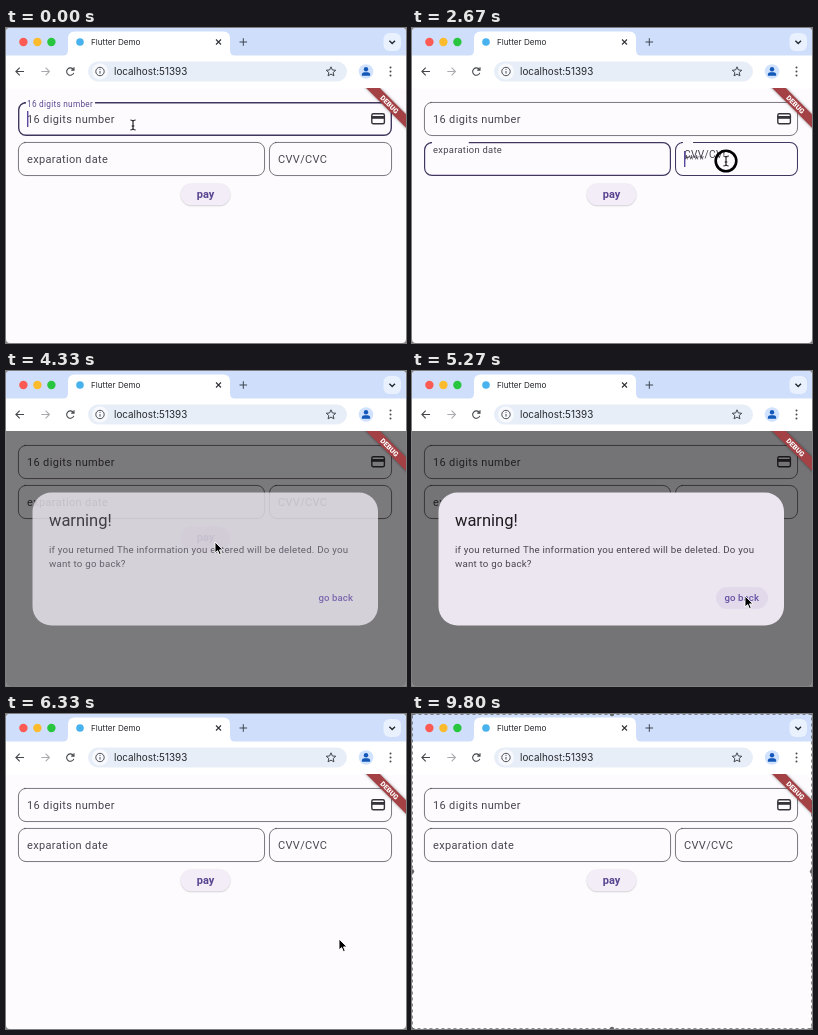
Write an HTML page with a canvas that moves like this. It is 400 px wide and 315 px high and loops after 9.87 s.

```html
<!DOCTYPE html>
<html lang="en">
<head>
<meta charset="utf-8">
<title>Card form</title>
<style>
  html, body { margin: 0; width: 100%; height: 100%; overflow: hidden; background: #fefbff; }
  canvas { display: block; width: 400px; height: 315px; }
</style>
</head>
<body>
<canvas id="stage"></canvas>
<script>
const W = 400, H = 315, LOOP = 9870;
const canvas = document.getElementById('stage');
const ctx = canvas.getContext('2d');
const dpr = window.devicePixelRatio || 1;
canvas.width = W * dpr;
canvas.height = H * dpr;

const INK = '#1d1b20', SOFT = '#49454f', PRIMARY = '#6750a4';
const ROBOTO = 'Roboto, sans-serif', UI = 'Inter, sans-serif';

const clamp = v => Math.max(0, Math.min(1, v));
const mix = (a, b, p) => a + (b - a) * p;
const ramp = (t, start, length) => clamp((t - start) / length);
const smooth = p => p * p * (3 - 2 * p);
const within = (t, a, b) => t >= a && t < b;

// Pointer stops: time, x, y of the hot spot
const route = [
  [0, 127, 97], [150, 127, 97], [950, 126, 133], [1650, 126, 133],
  [2300, 314, 133], [2950, 314, 133], [3500, 209, 172], [4270, 209, 171],
  [4650, 209, 171], [5250, 333, 225], [8130, 333, 225], [8730, 412, 287]
];
const clicks = [[1330, 1600], [2530, 2800], [3830, 4080], [5600, 5850]];

const fields = [
  { label: '16 digits number', hint: '16 digits number', x: 12, y: 74, w: 374, on: -1000, off: 1440 },
  { label: 'exparation date', hint: '', x: 12, y: 114, w: 247, on: 1440, off: 2607 },
  { label: 'CVV/CVC', hint: '****', x: 263, y: 114, w: 123, on: 2612, off: 3900 }
];
const FIELD_H = 34;

function box(x, y, w, h, r, fill) {
  ctx.beginPath();
  ctx.roundRect(x, y, w, h, r);
  if (fill) { ctx.fillStyle = fill; ctx.fill(); }
}
function disc(x, y, r, fill) {
  ctx.beginPath();
  ctx.arc(x, y, r, 0, 7);
  ctx.fillStyle = fill;
  ctx.fill();
}
function text(str, x, y, size, color, { font = ROBOTO, weight = 400, spacing = 0, align = 'left' } = {}) {
  ctx.font = `${weight} ${size}px ${font}`;
  ctx.letterSpacing = spacing + 'px';
  ctx.textAlign = align;
  ctx.fillStyle = color;
  ctx.fillText(str, x, y);
}
function line(d, color, width = 1.2) {
  ctx.strokeStyle = color;
  ctx.lineWidth = width;
  ctx.stroke(new Path2D(d));
}
function shape(d, fill, edge, width = 1) {
  const path = new Path2D(d);
  ctx.lineJoin = 'round';
  ctx.strokeStyle = edge;
  ctx.lineWidth = width;
  ctx.fillStyle = fill;
  ctx.fill(path);
  ctx.stroke(path);
}

function drawBrowser() {
  ctx.fillStyle = '#cfdffb';
  ctx.fillRect(0, 0, W, 30);
  ['#fb5b53', '#fbbb2d', '#28c53f'].forEach((c, i) => disc(17.4 + 14 * i, 14, 4.2, c));
  ctx.fillStyle = '#fff';
  ctx.fill(new Path2D('M56 28Q62 28 62 22V10Q62 3.5 69 3.5H217Q224 3.5 224 10V22Q224 28 230 28Z'));
  ctx.fillRect(0, 27.5, W, 33);
  disc(74, 14, 3.8, '#48b2ee');
  text('Flutter Demo', 85, 17, 8.15, '#24272c', { font: UI });
  line('M210 11.5l5 5M215 11.5l-5 5', '#303338', 1.1);
  line('M233.5 14h7.6M237.3 10.2v7.6', '#3d4550', 1);
  box(377.5, 5, 17.5, 18, 6, '#e9f1fe');
  line('M383.4 12.7l2.8 2.8 2.8-2.8', '#252a32', 1.4);

  line('M18 43.5H10M13.7 39.7l-3.8 3.8 3.8 3.8', '#44474b', 1.1);
  line('M35.3 43.5h8M39.6 39.7l3.8 3.8-3.8 3.8', '#a9abae', 1.1);
  line('M67.4 41.5a3.7 3.7 0 1 0 .4 3.4M68 39.3v2.8h-2.8', '#44474b', 1.1);
  box(82, 33.5, 259, 20, 10, '#e8eef8');
  disc(94, 43.5, 8, '#f7f9fd');
  line('M98.2 43.5a4.2 4.2 0 1 1-8.4 0a4.2 4.2 0 1 1 8.4 0M94 43v2.6M94 40.9v1', '#4b4e53', 1);
  text('localhost:51393', 108, 47, 9.9, '#25282c', { font: UI });

  ctx.beginPath();
  for (let i = 0; i < 10; i++) {
    const a = -Math.PI / 2 + i * Math.PI / 5, r = i % 2 ? 2.3 : 5;
    ctx.lineTo(325 + r * Math.cos(a), 43.8 + r * Math.sin(a));
  }
  ctx.closePath();
  ctx.strokeStyle = '#43474d';
  ctx.lineWidth = 1;
  ctx.stroke();
  disc(360, 43.5, 7.3, '#d1e2ff');
  disc(360, 41.2, 2.2, '#1357b8');
  box(355.8, 44.2, 8.4, 3.6, [3, 3, 1, 1], '#1357b8');
  [39.5, 43.5, 47.5].forEach(y => disc(384.5, y, 1, '#44474b'));
}

function drawField(f, t) {
  const p = smooth(ramp(t, f.on, 167)) * (1 - smooth(ramp(t, f.off, 145)));
  const tx = f.x + 9, baseline = f.y + 20.5;
  const size = mix(11, 8.27, p), spacing = size / 32;
  ctx.font = `400 8.27px ${ROBOTO}`;
  ctx.letterSpacing = '.26px';
  const gap = (ctx.measureText(f.label).width + 5) * p;

  // Outline lies inside the box; it starts right of the label gap and runs round to its left end
  const stroke = mix(.9, 1.4, p), inset = stroke / 2, r = 8 - inset;
  const left = f.x + inset, top = f.y + inset;
  const right = f.x + f.w - inset, bottom = f.y + FIELD_H - inset;
  ctx.beginPath();
  ctx.moveTo(tx - 3 + gap, top);
  ctx.arcTo(right, top, right, bottom, r);
  ctx.arcTo(right, bottom, left, bottom, r);
  ctx.arcTo(left, bottom, left, top, r);
  ctx.arcTo(left, top, right, top, r);
  ctx.lineTo(tx - 3, top);
  ctx.strokeStyle = p > .05 ? '#41375f' : '#6b6770';
  ctx.lineWidth = stroke;
  ctx.stroke();

  text(f.label, tx, mix(baseline, f.y + 4.5, p), size, p > .8 ? '#5c4a92' : SOFT, { spacing });
  if (f.hint) {
    ctx.globalAlpha = clamp(p * 4);
    text(f.hint, tx, baseline, 11, SOFT, { spacing: .344 });
    ctx.globalAlpha = 1;
  }
  const age = t - Math.max(f.on, 0);
  if (within(t, f.on, f.off) && age % 1000 < 500) {
    ctx.fillStyle = '#5b479b';
    ctx.fillRect(tx, f.y + 9, 1.4, 16);
  }
}

function drawPay(t) {
  const pressed = ramp(t, 3920, 180) * (1 - ramp(t, 4400, 250));
  const hover = within(t, 3450, 4260);
  ctx.save();
  ctx.shadowColor = 'rgba(0,0,0,.25)';
  ctx.shadowBlur = 1.4 * dpr;
  ctx.shadowOffsetY = .5 * dpr;
  box(174.8, 155.5, 49.4, 22, 11, '#f3edf7');
  ctx.restore();
  ctx.save();
  box(174.8, 155.5, 49.4, 22, 11);
  ctx.clip();
  if (hover) box(174, 155, 51, 24, 0, 'rgba(103,80,164,.08)');
  if (pressed) {
    box(174, 155, 51, 24, 0, `rgba(80,65,120,${.12 * pressed})`);
    disc(208, 169, mix(4, 14, pressed), `rgba(103,80,164,${.13 * pressed})`);
  }
  ctx.restore();
  text('pay', 199.5, 170.3, 11, '#584490', { weight: 600, spacing: .05, align: 'center' });
}

function drawCardIcon() {
  ctx.strokeStyle = '#36333a';
  ctx.lineWidth = 1.4;
  box(365.8, 85.8, 12.6, 10, 1.5);
  ctx.stroke();
  ctx.fillStyle = '#36333a';
  ctx.fillRect(365.5, 88, 13.2, 2.8);
}

function drawBanner() {
  ctx.save();
  ctx.beginPath();
  ctx.rect(0, 60, W, H - 60);
  ctx.clip();
  ctx.translate(383.5, 76.5);
  ctx.rotate(Math.PI / 4);
  ctx.shadowColor = 'rgba(0,0,0,.45)';
  ctx.shadowBlur = 3 * dpr;
  box(-40, -4.8, 80, 9.6, 0, '#a34145');
  ctx.shadowColor = 'transparent';
  text('DEBUG', 0, 2.5, 7, '#fff', { weight: 900, align: 'center' });
  ctx.restore();
}

function dialogLevel(t) {
  const enter = 1 - (1 - ramp(t, 4250, 145)) ** 2;
  return enter * (1 - ramp(t, 5880, 125));
}

function drawDialog(t, level) {
  ctx.save();
  ctx.globalAlpha = level;
  box(26.5, 121.5, 345.5, 133, 19, '#ece6f0');
  text('warning!', 43, 155, 16.5, INK);
  const body = { spacing: .22 };
  text('if you returned The information you entered will be deleted. Do you', 43, 181.5, 9.7, SOFT, body);
  text('want to go back?', 43, 195.5, 9.7, SOFT, body);
  if (t > 5150) {
    const press = ramp(t, 5650, 200);
    box(304, 216, 52, 22, 11, `rgba(103,80,164,${.08 + .08 * press})`);
  }
  text('go back', 312.5, 230.3, 9.65, PRIMARY, { weight: 500, spacing: .07 });
  ctx.restore();
}

function pointerAt(t) {
  for (let i = 1; i < route.length; i++) {
    const [a, ax, ay] = route[i - 1], [b, bx, by] = route[i];
    if (t < b) {
      const p = smooth(ramp(t, a, b - a));
      return [mix(ax, bx, p), mix(ay, by, p)];
    }
  }
  return null;
}

function drawPointer(t) {
  const at = pointerAt(t);
  if (!at) return;
  const [x, y] = at;
  const inside = (bx, by, bw, bh) => x > bx && x < bx + bw && y > by && y < by + bh;
  const overField = t < 4250 && fields.some(f => inside(f.x, f.y, f.w, FIELD_H));
  const overPay = t < 4260 && inside(174, 155, 51, 24);
  ctx.save();
  ctx.translate(x, y);
  if (clicks.some(([a, b]) => within(t, a, b))) {
    ctx.beginPath();
    ctx.arc(0, 0, 10.3, 0, 7);
    ctx.strokeStyle = '#000';
    ctx.lineWidth = 2.6;
    ctx.stroke();
  }
  if (overField) {
    const beam = 'M-2.6-5Q-.2-5 0-3.5Q.2-5 2.6-5M0-3.5V3.5M-2.6 5Q-.2 5 0 3.5Q.2 5 2.6 5M-1.3 1H1.3';
    line(beam, '#fff', 2.4);
    line(beam, '#111', 1.1);
  } else if (overPay) {
    shape('M-1.3 7V1Q-1.2-.3 0-.3T1.2 1V4.5Q2.8 3.6 3.5 5Q5-.1 5.5 5.5Q7 5 7.2 6.8V9Q7 11 6 12.2H.8Q0 10.5-1.8 9Q-4 6.6-2.8 6Q-2 5.8-1.3 7Z', '#fff', '#111');
    line('M2.2 8v2.4M4.2 8v2.4', '#111', .7);
  } else if (t > 7270) {
    shape('M-3.2 1.2L-4.2-3Q-3.8-4.6-2.5-3.6Q-2.4-6-1-5.4Q.2-6.6 1.3-5.2Q2.9-5.8 3.2-3.6Q4.8-4 4.9-2.2L4.4 2.2L3 5.2H-1.6Q-2.5 3.4-4.6 1.6Q-5.4.1-3.2 1.2Z', '#fff', '#222', .9);
    line('M-2.5-3.6l.8 3.2M-.9-5.2l.4 4.4M1.3-5v4.2M3.2-3.6l-.4 3', '#222', .8);
  } else {
    shape('M0 0V11L2.6 8.6L4.4 12.6L6.2 11.8L4.5 7.9H8Z', '#000', '#fff', .9);
  }
  ctx.restore();
}

function drawMarquee() {
  ctx.save();
  ctx.lineWidth = 1;
  ctx.setLineDash([3, 3]);
  ctx.strokeStyle = 'rgba(80,80,80,.65)';
  ctx.strokeRect(.5, .5, W - 1, H - 1);
  ctx.restore();
  [[0, 157.5], [W, 157.5], [200, 0], [200, H]].forEach(([x, y]) => disc(x, y, 2.2, '#666'));
}

function draw(t) {
  ctx.setTransform(dpr, 0, 0, dpr, 0, 0);
  ctx.fillStyle = '#858585';
  ctx.fillRect(0, 0, W, H);
  ctx.save();
  box(0, 0, W, H, 4);
  ctx.clip();
  ctx.fillStyle = '#fefbff';
  ctx.fillRect(0, 0, W, H);
  drawBrowser();
  fields.forEach(f => drawField(f, t));
  drawCardIcon();
  drawPay(t);
  const level = dialogLevel(t);
  if (level > 0) {
    ctx.fillStyle = `rgba(0,0,0,${.54 * (1 - (1 - level) ** 2)})`;
    ctx.fillRect(0, 60, W, H - 60);
    drawDialog(t, level);
  }
  drawBanner();
  ctx.restore();
  if (t >= 7070) drawMarquee();
  drawPointer(t);
}

const start = performance.now();
function tick() {
  draw((performance.now() - start) % LOOP);
  requestAnimationFrame(tick);
}
tick();
</script>
</body>
</html>
```
